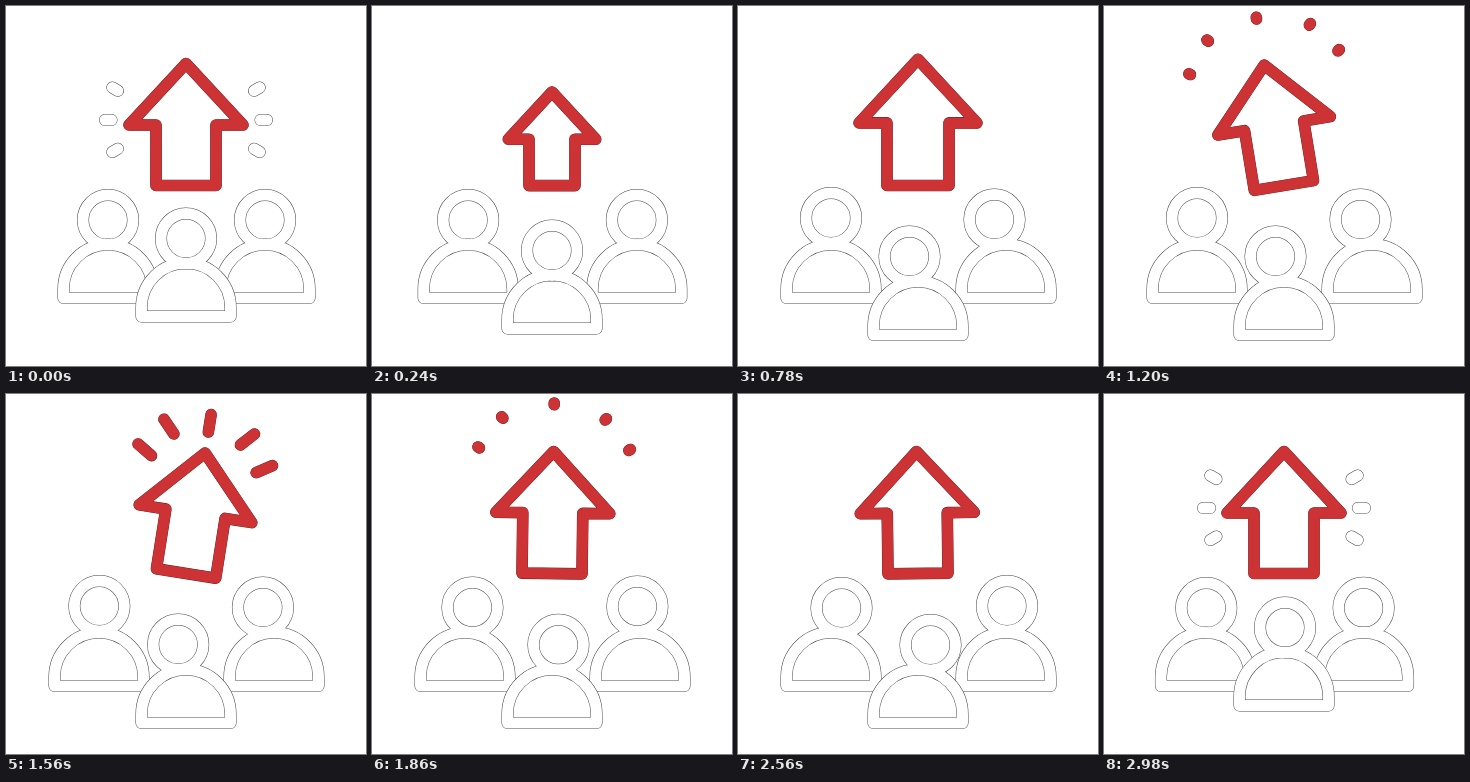
An HTML page with a canvas that plays this animation: 360x360 px, repeating every 3 s.

```html
<!DOCTYPE html>
<html lang="en">
<head>
<meta charset="utf-8">
<title>Team growth</title>
<style>
html, body { margin: 0; width: 100%; height: 100%; overflow: hidden; background: #fff; }
canvas { display: block; width: 360px; height: 360px; }
</style>
</head>
<body>
<canvas id="stage" width="360" height="360"></canvas>
<script>
const ctx = document.getElementById('stage').getContext('2d');
const LOOP = 3000, WEIGHT = 11, RED = '#cd3235', EDGE = '#484848';
const start = performance.now();

// Keyframes as [time, value] pairs, eased in and out
const SCALE = [[0, 1], [460, .565], [770, 1.035], [900, 1]];
const ANGLE = [[780, 0], [1170, -9.7], [1540, 9], [2200, -8.2], [2640, 0]];
const SPREAD = [[0, 0], [400, 1], [2700, 1], [2980, .06], [3000, 0]];
const LEFT = [[440, 0], [760, 1], [1500, 1], [2060, 0]];
const RIGHT = [[1500, 0], [2060, 1], [2650, 1], [2980, .08], [3000, 0]];

// Place, shift when spread, and head offsets when looking left and right
const PEOPLE = [
  { x: 102, y: 283, out: [-9, 0], left: [0, -2], right: [10.5, 0] },
  { x: 259, y: 283, out: [9, 0], left: [-11.5, -.5], right: [1, -2] },
  { x: 180, y: 301.5, out: [0, 18.5], left: [-8.5, -.5], right: [12.5, 0] }
];

// Rays as x, y of the outer end and degrees from vertical
const TOP_RAYS = [[180, 11, 0], [129, 25, -43], [231, 25.5, 43], [106, 55, -58], [255, 55.5, 58]];
const SIDE_RAYS = [[108, 82.5, -60], [101, 114, -90], [108, 145, -120],
                   [252, 82.5, 60], [259, 114, 90], [252, 145, 120]];

function at(keys, t) {
  const i = keys.findIndex(k => k[0] > t);
  if (i === 0) return keys[0][1];
  if (i < 0) return keys[keys.length - 1][1];
  const [t0, a] = keys[i - 1], [t1, b] = keys[i];
  const p = (t - t0) / (t1 - t0);
  return a + (b - a) * p * p * (3 - 2 * p);
}

function stroke(path, color, width) {
  ctx.strokeStyle = color;
  ctx.lineWidth = width;
  ctx.stroke(path);
}

function outlined(path, color, edge, rim) {
  stroke(path, edge, WEIGHT + rim);
  stroke(path, color, WEIGHT);
}

function person(p, spread, l, r) {
  const x = p.x + p.out[0] * spread, y = p.y + p.out[1] * spread;
  const hx = x + p.left[0] * l + p.right[0] * r;
  const hy = y - 69 + p.left[1] * l + p.right[1] * r;
  const shape = new Path2D();
  shape.moveTo(x - 44.5, y + 9);
  shape.arc(x, y, 44.5, Math.PI, 0);
  shape.lineTo(x + 44.5, y + 9);
  shape.closePath();
  shape.moveTo(hx + 25, hy);
  shape.arc(hx, hy, 25, 0, 7);
  shape.closePath();
  ctx.fillStyle = '#fff';
  ctx.fill(shape);
  outlined(shape, '#fff', EDGE, 1);
}

function arrow(s) {
  const shape = new Path2D();
  for (const [x, y] of [[0, -122.5], [57, -61], [30, -61], [30, -.5], [-30, -.5], [-30, -61], [-57, -61]])
    shape.lineTo(180 + x * s, 180 + y * s);
  shape.closePath();
  outlined(shape, RED, '#5a1a1c', .6);
}

// Each ray shoots outward: its outer end leads, its inner end catches up
function burst(rays, p, reach, color, edge, rim, lag) {
  if (p <= 0 || p >= 1) return;
  const outer = 2 - reach * (1 - p) ** 5;
  const inner = 2 - reach * (1 - p) ** lag;
  const shape = new Path2D();
  for (const [x, y, deg] of rays) {
    const a = deg * Math.PI / 180, dx = Math.sin(a), dy = -Math.cos(a);
    shape.moveTo(x + dx * inner, y + dy * inner);
    shape.lineTo(x + dx * outer, y + dy * outer);
  }
  outlined(shape, color, edge, rim);
}

function draw() {
  const t = (performance.now() - start) % LOOP;
  ctx.fillStyle = '#fff';
  ctx.fillRect(0, 0, 360, 360);
  ctx.lineJoin = ctx.lineCap = 'round';

  const spread = at(SPREAD, t), l = at(LEFT, t), r = at(RIGHT, t);
  for (const p of PEOPLE) person(p, spread, l, r);

  burst(SIDE_RAYS, ((t + 400) % LOOP - 50) / 520, 16, '#fff', EDGE, 1, .8);

  ctx.save();
  ctx.translate(180, 180);
  ctx.rotate(at(ANGLE, t) * Math.PI / 180);
  ctx.translate(-180, -180);
  for (const begin of [795, 1455, 2115])
    burst(TOP_RAYS, (t - begin) / 440, 38, RED, '#5a1a1c', .6, 1.2);
  arrow(at(SCALE, t));
  ctx.restore();

  requestAnimationFrame(draw);
}
draw();
</script>
</body>
</html>
```
